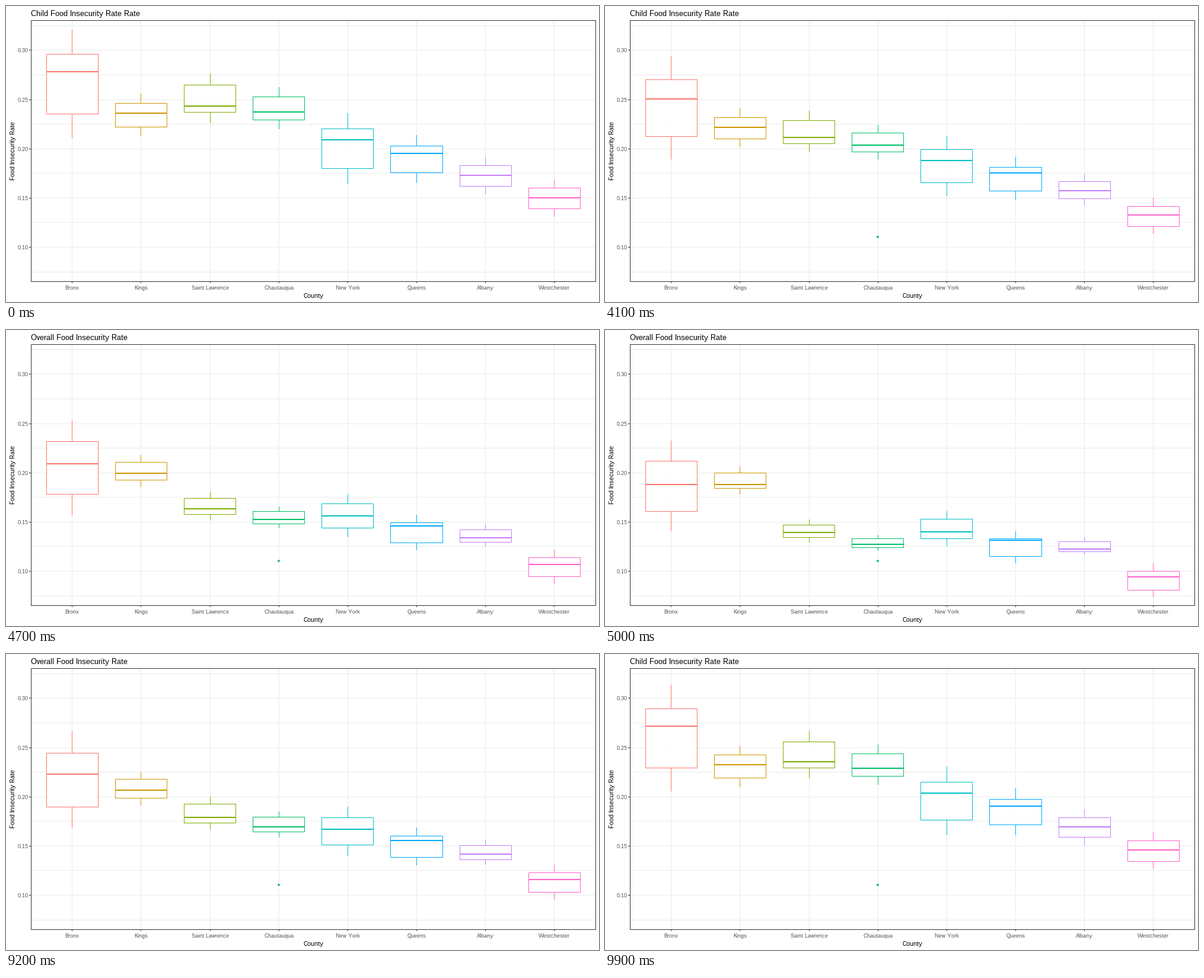
Animation of 1000 by 500 pixels, one loop 10000 ms. Source, as a matplotlib script:

```python
import numpy as np
import matplotlib.pyplot as plt
from matplotlib.animation import FuncAnimation
from matplotlib.patches import Circle, Rectangle

plt.rcParams.update({
    "font.family": "Liberation Sans",
    "text.hinting": "native",
    "text.hinting_factor": 1,
    "text.kerning_factor": 6,
})

WIDTH, HEIGHT = 1000, 500
FRAMES, INTERVAL = 100, 100
HALF, HOLD = FRAMES // 2, 37
TWEEN, TITLE_SWITCH = HALF - HOLD, 45
LEFT, RIGHT, TOP, BOTTOM = 42, 994, 24, 465
BOX_HALF_WIDTH = 43.57
WHISKER = 0.4  # whisker length as a share of the box height
GRID, INK, GREY = "#EBEBEB", "#333333", "#4D4D4D"
TITLES = "Child Food Insecurity Rate Rate", "Overall Food Insecurity Rate"

# County, colour, then (Q3, median, Q1) in thousandths: child, overall
COUNTIES = [
    ("Bronx", "#F8766D", (296, 278, 235), (212, 188, 161)),
    ("Kings", "#CD9600", (246, 236, 222), (200, 188, 184)),
    ("Saint Lawrence", "#7CAE00", (265, 243, 237), (147, 139, 134)),
    ("Chautauqua", "#00BE67", (253, 237, 229), (133, 127, 124)),
    ("New York", "#00BFC4", (220, 209, 180), (153, 140, 133)),
    ("Queens", "#00A9FF", (203, 195, 176), (133, 131, 115)),
    ("Albany", "#C77CFF", (183, 173, 162), (130, 122, 120)),
    ("Westchester", "#FF61CC", (160, 150, 139), (100, 94, 81)),
]


def snap(value):
    return np.floor(value + 0.5)


def x_pos(index):
    return 111.3 + 116.13 * index


def y_pos(thousandths):
    return 74.35 + (300 - np.asarray(thousandths)) * 1.6635


fig = plt.figure(figsize=(WIDTH / 72, HEIGHT / 72), dpi=72, facecolor="white")
ax = fig.add_axes([0, 0, 1, 1])
ax.set(xlim=(0, WIDTH), ylim=(HEIGHT, 0))
ax.axis("off")


def line(xs, ys, color, width=1, z=1):
    return ax.plot(xs, ys, color=color, lw=width, zorder=z, snap=False,
                   solid_capstyle="butt")[0]


def frame_rect(x0, y0, x1, y1, edge, fill, z):
    return ax.add_patch(Rectangle(
        (x0 + 0.5, y0 + 0.5), x1 - x0, y1 - y0, edgecolor=edge, facecolor=fill,
        lw=1, zorder=z, snap=False, joinstyle="miter"))


def label(x, y, text, size, color="black", ha="center", rotation=0):
    return ax.text(x, y, text, fontsize=size, color=color, ha=ha,
                   va="baseline", rotation=rotation, rotation_mode="anchor")


class Box:
    def __init__(self, index, color, child, overall):
        center = snap(x_pos(index)) + 0.5
        x0, x1 = (snap(x_pos(index) + side * BOX_HALF_WIDTH) for side in (-1, 1))
        self.child, self.overall = y_pos(child), y_pos(overall)
        self.upper = line([center] * 2, [0, 0], color, z=3)
        self.lower = line([center] * 2, [0, 0], color, z=3)
        self.body = frame_rect(x0, 0, x1, 0, color, (1, 1, 1, 0.9), 4)
        self.median = line([x0, x1 + 1], [0, 0], color, 2, z=5)

    def update(self, weight):
        levels = self.child + (self.overall - self.child) * weight
        reach = WHISKER * (levels[2] - levels[0])
        q3, median, q1 = snap(levels)
        self.upper.set_ydata([snap(levels[0] - reach), q3])
        self.lower.set_ydata([q1 + 1, snap(levels[2] + reach)])
        self.body.set_y(q3 + 0.5)
        self.body.set_height(q1 - q3)
        self.median.set_ydata([median, median])


# Grid, ticks and labels
for value in range(75, 326, 25):
    y = snap(y_pos(value)) + 0.5
    line([LEFT, RIGHT], [y, y], GRID)
    if value % 50 == 0:
        line([LEFT - 3, LEFT], [y, y], INK)
        label(37.3, y + 3.5, f"{value / 1000:.2f}", 9, GREY, "right")

boxes = []
for i, (name, color, child, overall) in enumerate(COUNTIES):
    x = snap(x_pos(i)) + 0.5
    line([x, x], [TOP, BOTTOM], GRID)
    line([x, x], [BOTTOM + 1, BOTTOM + 3], INK)
    label(x, 479, name, 9, GREY)
    boxes.append(Box(i, color, child, overall))

frame_rect(LEFT, TOP, RIGHT, BOTTOM, INK, "none", 8)
outlier = ax.add_patch(Circle((snap(x_pos(3)), 390), 1.9,
                              facecolor=COUNTIES[3][1], lw=0, zorder=3))
title = label(LEFT, 17, TITLES[0], 13, ha="left")
label(518, 493, "County", 11)
label(15, 245, "Food Insecurity Rate", 11, rotation=90)


def update(frame):
    going_back, step = divmod(frame, HALF)
    progress = max(0, step - HOLD) / TWEEN
    weight = 1 - progress if going_back else progress
    for box in boxes:
        box.update(weight)
    outlier.set_visible(weight > 0)
    title.set_text(TITLES[going_back ^ (step >= TITLE_SWITCH)])
    return []


animation = FuncAnimation(fig, update, frames=FRAMES, interval=INTERVAL,
                          init_func=lambda: update(0), repeat=True,
                          repeat_delay=0, blit=False)
plt.show()
```
